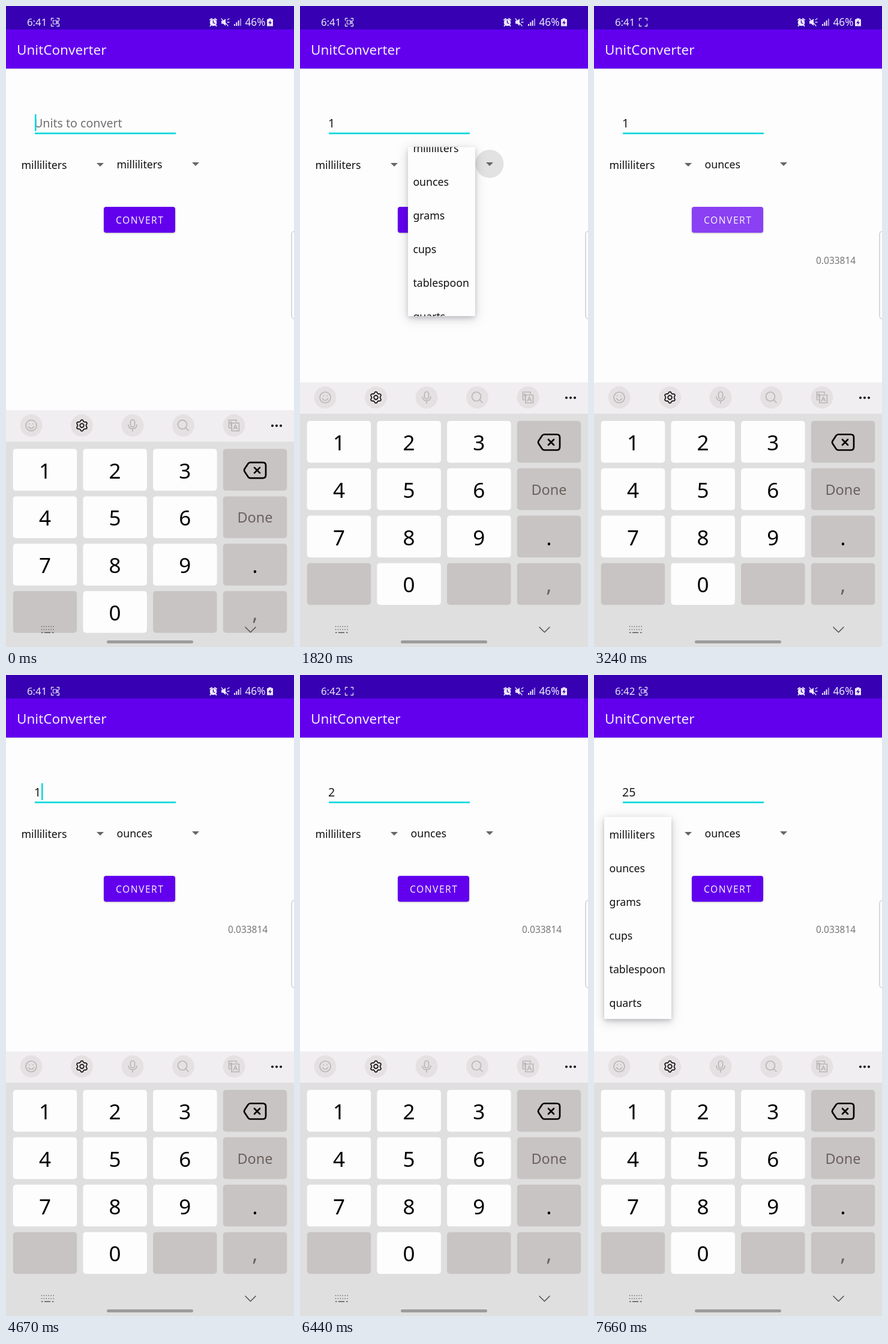
An HTML page that plays this animation: 480 by 1066 pixels, repeating every 8000 ms.

```html
<!DOCTYPE html>
<html lang="en">
<head>
<meta charset="utf-8">
<title>Unit converter</title>
<style>
html, body { margin: 0; width: 100%; height: 100%; overflow: hidden; background: #fdfdfd; }
svg { display: block; width: 480px; height: 1066px; font-family: "Noto Sans", "Open Sans", sans-serif; }
.line { fill: none; stroke-linecap: round; stroke-linejoin: round; }
.unit { font-size: 17.7px; fill: #111; }
#panel { fill: #fdfdfd; filter: drop-shadow(0 3px 3px rgba(0, 0, 0, .14)) drop-shadow(0 4px 9px rgba(30, 30, 60, .2)); }
</style>
</head>
<body>
<svg viewBox="0 0 480 1066">
  <defs>
    <clipPath id="panelClip"><rect id="clip" width="112"/></clipPath>
    <clipPath id="buttonClip"><rect x="163" y="334" width="119" height="43" rx="4"/></clipPath>
  </defs>
  <rect width="480" height="1066" fill="#fdfdfd"/>
  <rect y="39" width="480" height="65" fill="#6200ee"/>
  <rect width="480" height="39" fill="#3700b3"/>
  <path d="M0 104.5H480" stroke="#dcdce2"/>
  <text x="18" y="81" font-size="22.5" fill="#f4eefe">UnitConverter</text>

  <!-- status bar -->
  <g fill="#eee8fa">
    <text id="clock" x="35" y="33" font-size="16.8"></text>
    <text x="398.5" y="33" font-size="17.2">46%</text>
    <path class="line" stroke="#e4dcf4" stroke-width="1.3" d="M75.5 24V20.5H79M85 20.5H88.5V24M88.5 30V33.5H85M79 33.5H75.5V30"/>
    <path id="camera" class="line" stroke="#e4dcf4" stroke-width="1.2" d="M78.5 24H84V30H78.5ZM84 27L87 24.5V29.5L84 27"/>
    <circle cx="345.5" cy="27.5" r="5.8"/>
    <path class="line" stroke="#eee8fa" stroke-width="2" d="M340 23L343 21M351 23L348 21M341.5 32L340.5 33M349.5 32L350.5 33"/>
    <path class="line" stroke="#3700b3" stroke-width="1.3" d="M345.5 24.5V28L348 29"/>
    <path d="M359 24.5H362L366 21V33L362 29.5H359Z"/>
    <path class="line" stroke="#eee8fa" stroke-width="1.3" d="M359 21L370 33M369 23L372 21M369 27H372"/>
    <path d="M380 30h2v3h-2zM383.3 27h2v6h-2zM386.6 24h2v9h-2z"/>
    <path d="M390 21h2v12h-2z" opacity=".6"/>
    <path d="M437.5 20.5H442.5V22H445V33.5H435V22H437.5Z"/>
    <path fill="#3700b3" d="M441 23.5L437 28.5H440L439 32L443 27H440.5Z"/>
  </g>

  <!-- form -->
  <text id="input" x="47" y="202" font-size="19.6"></text>
  <rect x="48" y="210.5" width="235" height="2.7" fill="#03d8dc"/>
  <rect id="cursor" y="180" width="2.5" height="28" fill="#03d8dc"/>
  <circle id="halo" r="23.5" fill="#e2e2e2"/>
  <text class="unit" x="25.5" y="271">milliliters</text>
  <text class="unit" id="toUnit" x="184.5" y="270"></text>
  <path fill="#666" d="M151 261H163L157 267ZM310 260H322L316 266Z"/>
  <rect x="163" y="334" width="119" height="43" rx="4" fill="#6200ee" style="filter:drop-shadow(0 1px 1px #b8b8c0)"/>
  <circle id="ripple" cx="222" cy="356" fill="#fff" clip-path="url(#buttonClip)"/>
  <text x="183" y="362" font-size="15.6" letter-spacing="1.5" fill="#f4eefe">CONVERT</text>
  <text id="result" x="370" y="429" font-size="15.5" fill="#777">0.033814</text>
  <rect x="476" y="374.5" width="20" height="146" rx="5" fill="#fdfdfd" stroke="#b4b4b4"/>

  <g id="keyboard"></g>
  <g class="line" stroke="#555" stroke-width="1.6">
    <path d="M59.5 1032H80M59.5 1037H80" stroke-dasharray=".1 3.8"/>
    <path d="M59.5 1042H61M64.5 1042H73.5M77.5 1042H79"/>
    <path d="M399 1033L407.5 1041.5L416 1033"/>
  </g>
  <rect x="168" y="1055" width="144" height="5" rx="2.5" fill="#9d9c9c"/>

  <g id="menu">
    <rect id="panel" width="112" rx="1"/>
    <g clip-path="url(#panelClip)"><g id="list"></g></g>
  </g>
</svg>
<script>
const $ = id => document.getElementById(id);
const set = (id, attrs) => { for (const k in attrs) $(id).setAttribute(k, attrs[k]); };
const clamp = v => Math.max(0, Math.min(1, v));
const ramp = (t, a, b) => clamp((t - a) / (b - a));
const pulse = (t, a, b, c, d) => ramp(t, a, b) * (1 - ramp(t, c, d));

// cubic-bezier(.4, 0, .2, 1)
function ease(x) {
  let lo = 0, hi = 1, u = x;
  for (let i = 0; i < 20; i++) {
    u = (lo + hi) / 2;
    const bx = 1.2 * u * (1 - u) ** 2 + .6 * u * u * (1 - u) + u ** 3;
    if (bx < x) lo = u; else hi = u;
  }
  return x >= 1 ? 1 : 3 * u * u * (1 - u) + u ** 3;
}

function buildKeyboard() {
  let s = '<rect y="626" width="480" height="440" fill="#e0dfdf"/><rect y="626" width="480" height="52" fill="#f0eef1"/>';
  for (const x of [42, 126.5, 211, 295.5, 380]) s += `<circle cx="${x}" cy="651" r="18.5" fill="#e5e1e2"/>`;

  let gear = '';
  for (let i = 0; i <= 72; i++) {
    const a = i * Math.PI / 36, r = 8.2 + 1.2 * Math.cos(6 * a);
    gear += `${i ? 'L' : 'M'}${(126.5 + r * Math.sin(a)).toFixed(1)} ${(651 - r * Math.cos(a)).toFixed(1)}`;
  }
  s += `<g class="line" stroke="#b8b6b7" stroke-width="1.7">
    <circle cx="42" cy="651" r="9"/><path d="M37.5 653Q42 659 46.5 653M39 648V648.5M45 648V648.5"/>
    <rect x="207.5" y="641.5" width="7" height="12" rx="3.5"/><path d="M204 650Q204.5 656.5 211 656.5T218 650M211 657V660.5"/>
    <circle cx="294" cy="649.5" r="7.5"/><path d="M299.5 655L304 659.5"/>
    <path d="M376 655H371.5V642H384V645M376 647H388.5V660H376ZM379 657L382.3 650L385.5 657M380 655H384.5M375 651V645M373 647L375 645L377 647"/>
    <path stroke="#111" d="${gear}Z"/><circle stroke="#111" cx="126.5" cy="651" r="3.3"/></g>`;
  for (const x of [444, 451, 458]) s += `<circle cx="${x}" cy="651.5" r="2"/>`;

  ['1', '2', '3', 'del', '4', '5', '6', 'Done', '7', '8', '9', '.', '', '0', '', ','].forEach((key, i) => {
    const x = 11.7 + 116.7 * (i % 4), y = 690 + 78.8 * (i >> 2);
    const digit = /\d/.test(key), done = key === 'Done';
    const box = `x="${x}" y="${y}" width="106.5" height="69.5" rx="5"`;
    s += `<rect ${box} fill="${digit ? '#fdfdfd' : '#c8c4c3'}"/>`;
    if (digit || key === 'del') s += `<rect id="key${key}" ${box} fill="#666" opacity="0"/>`;
    if (key === 'del') {
      s += '<path class="line" stroke="#000" stroke-width="2.7" d="M407 712.5H428Q433 712.5 433 717.5V733.5Q433 738.5 428 738.5H407Q405 738.5 403.5 736.5L397.5 727.5Q396.5 725.5 397.5 723.5L403.5 714.5Q405 712.5 407 712.5ZM414 721L423 730M423 721L414 730"/>';
    } else {
      s += `<text x="${x + 53.2}" y="${y + (done ? 44 : 49)}" font-size="${done ? 23.5 : 35}" fill="${done || key === ',' ? '#6b615e' : '#000'}" text-anchor="middle">${key}</text>`;
    }
  });
  $('keyboard').innerHTML = s;
}

buildKeyboard();
$('list').innerHTML = '<rect id="picked" y="56" width="112" height="56" fill="#dcdcdc"/>' +
  ['milliliters', 'ounces', 'grams', 'cups', 'tablespoon', 'quarts']
    .map((u, i) => `<text class="unit" x="8.5" y="${35.5 + 56 * i}">${u}</text>`).join('');

// [time, text, caret x]
const edits = [[0, '', 48], [970, '1', 59], [5300, '', 48], [5940, '2', 59], [6530, '25', 70.5]];
const caretOn = [[0, 500], [970, 1470], [2480, 2980], [3480, 3980], [4480, 5010], [5300, 5800], [5940, 6440], [6530, 7020]];
const presses = { key1: 920, keydel: 5220, key2: 5850, key5: 6450 };

function drawMenu(t) {
  const left = t > 5000, x = left ? 17 : 176, y = left ? 236 : 234.5, start = left ? 7340 : 1690;
  const p = ease(ramp(t, start, start + 250)), q = 1 - p;
  const out = left ? 0 : ramp(t, 2480, 2780) ** 2;
  const area = { x: x + 20 * q, y, height: 56 + 280 * p };
  set('panel', area);
  set('clip', area);
  set('list', { transform: `translate(${x + 20 * q} ${y - 139 * q})` });
  set('menu', { opacity: ramp(t, start, start + 100) * (1 - out) });
  set('picked', { opacity: pulse(t, 2180, 2280, 2400, 2520) });
  set('halo', {
    cx: left ? 157 : 316, cy: left ? 264 : 262.5,
    opacity: pulse(t, start - 120, start - 20, start + 150, start + 270)
  });
}

function draw(t) {
  const [, value, caret] = edits.filter(e => t >= e[0]).pop();
  $('input').textContent = value || 'Units to convert';
  set('input', { fill: value ? '#1c1c1c' : '#707070' });
  set('cursor', { x: caret, opacity: +caretOn.some(([a, b]) => t >= a && t < b) });

  $('clock').textContent = t < 5300 ? '6:41' : '6:42';
  const beat = t % 1000;
  set('camera', { opacity: +(beat < 170 || beat > 650) });

  set('keyboard', { transform: `translate(0 ${47 * (1 - ramp(t, 0, 350)) ** 3})` });
  for (const id in presses) {
    const a = presses[id];
    set(id, { opacity: .25 * pulse(t, a, a + 40, a + 110, a + 220) });
  }

  $('toUnit').textContent = t < 2620 ? 'milliliters' : 'ounces';
  set('ripple', { r: 20 + 50 * ramp(t, 3050, 3250), opacity: .25 * pulse(t, 3050, 3120, 3250, 3520) });
  set('result', { opacity: +(t >= 3200) });
  drawMenu(t);
}

const begin = performance.now();
function tick() {
  draw((performance.now() - begin) % 8000);
  requestAnimationFrame(tick);
}
tick();
</script>
</body>
</html>
```
